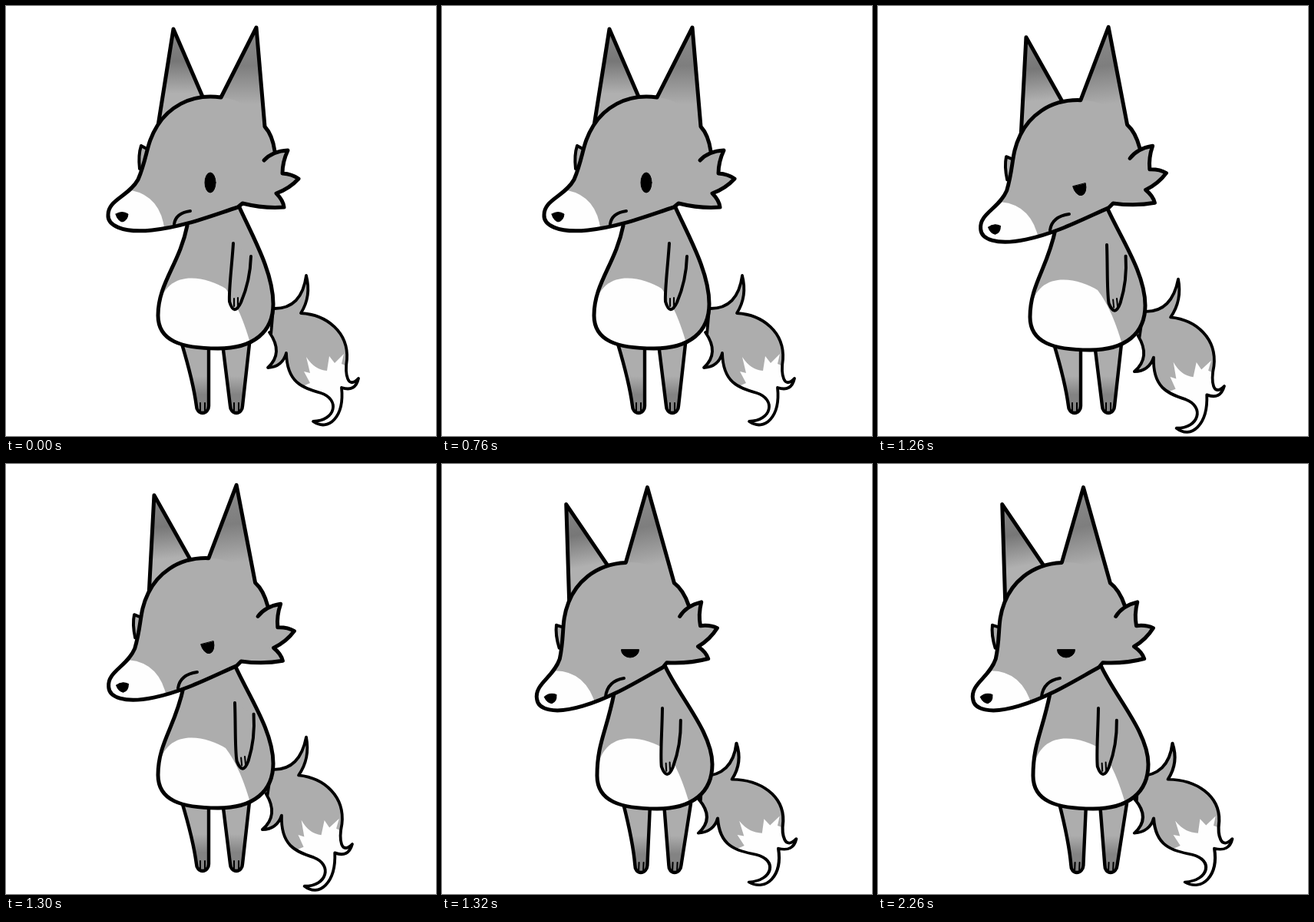
Recreate the animation shown at these times as an HTML page with a canvas. Size 560x560 px, loop 2880 ms.

```html
<!DOCTYPE html>
<html lang="en">
<head>
<meta charset="utf-8">
<title>Drowsy fox</title>
<style>
  html, body { margin: 0; width: 100%; height: 100%; overflow: hidden; background: #fff; }
  canvas { display: block; }
</style>
</head>
<body>
<canvas id="stage" width="560" height="560"></canvas>
<script>
const ctx = document.getElementById('stage').getContext('2d');
const GREY = '#adadad', WHITE = '#fefefe', INK = '#000';
const LOOP = 2880;

function fill(path, color) { ctx.fillStyle = color; ctx.fill(path); }
function line(path, width = 5) { ctx.lineWidth = width; ctx.stroke(path); }
function shape(path, color, width) { fill(path, color); line(path, width); }

function whitePatch(path, inside) {
  ctx.save();
  ctx.clip(inside);
  fill(path, WHITE);
  ctx.restore();
}

function shade(top, bottom, ...colors) {
  const gradient = ctx.createLinearGradient(0, top, 0, bottom);
  colors.forEach((color, i) => gradient.addColorStop(i / (colors.length - 1), color));
  return gradient;
}

function group(matrix, draw) {
  ctx.save();
  ctx.transform(matrix.a, matrix.b, matrix.c, matrix.d, matrix.e, matrix.f);
  draw();
  ctx.restore();
}

const still = new DOMMatrix();
const shift = (x, y) => new DOMMatrix().translate(x, y);

// Shear and stretch around a pivot that itself moves by dx, dy.
function bend(px, py, dx, dy, a, b, c, d) {
  return shift(px + dx, py + dy).multiply(new DOMMatrix([a, b, c, d, 0, 0])).translate(-px, -py);
}

const tail = new Path2D(`M345 428 L348 394 Q385 395 391 351 Q398 378 384 400
  C418 402 446 425 444 460 C441 480 445 500 459 485 Q455 503 437 497
  C441 535 420 555 400 541 C430 540 435 512 410 504 C385 497 366 490 365 452
  Q360 470 341 471 Q362 452 343 425`);
const tailTip = new Path2D(`M380 498 L396 491 388 476 396 478 391 457 Q402 474 418 475
  L421 456 428 465 440 453 437 466 470 480 V555 H390Z`);
const arm = new Path2D('M296 309 C294 340 290 370 291 385 Q297 405 306 386 Q318 358 319 326');
const fingers = new Path2D('M297 381 V391 M302 380 V391');

const skull = `M133 272 C133 252 160 248 172 226 C185 195 182 180 197 156
  C210 135 238 113 280 119 L326 28 337 157 Q347 168 350 189`;
const cheekAndJaw = `Q360 203 360 218 Q373 219 381 225 Q369 238 352 244 Q361 253 362 262
  Q336 264 308 257 L302 262 C265 274 230 288 190 292 C150 296 132 285 133 272`;
const head = new Path2D(`${skull} L367 188 ${cheekAndJaw}`);
const headLine = new Path2D(`${skull} M336 201 Q347 189 367 188 ${cheekAndJaw}`);
const farCheek = new Path2D('M174 212 Q172 194 176 182 L187 188');
const farEar = new Path2D('M198 156 L218 30 256 118');
const nearEar = new Path2D('M280 119 L326 28 337 157 Q315 122 280 119');
const muzzle = new Path2D('M120 242 L163 240 Q203 248 207 296 H120');
const nose = new Path2D('M143 271 Q151 266 159 271 Q158 280 151 281 Q145 279 143 271');

// The neck leans while the round base, placed by its left and bottom edge, stays put.
function drawBody([leftX, leftY, rightX, rightY], x, y) {
  const body = new Path2D();
  body.moveTo(leftX, leftY);
  body.bezierCurveTo(leftX - 10, leftY + 50, x, y - 85, x, y - 43);
  body.bezierCurveTo(x, y - 10, x + 30, y, x + 78, y);
  body.bezierCurveTo(x + 125, y, x + 150, y - 22, x + 150, y - 58);
  body.bezierCurveTo(x + 150, y - 100, rightX + 18, rightY + 40, rightX, rightY);
  const belly = new Path2D();
  belly.moveTo(x, y - 50);
  belly.bezierCurveTo(x + 8, y - 105, x + 60, y - 95, x + 88, y - 78);
  belly.quadraticCurveTo(x + 108, y - 52, x + 122, y);
  belly.lineTo(x, y);
  fill(body, GREY);
  whitePatch(belly, body);
  line(body);
}

function drawLeg(top, foot) {
  const leg = new Path2D();
  leg.moveTo(top, 440);
  leg.quadraticCurveTo(foot - 4, 490, foot, 521);
  leg.ellipse(foot + 8, 521, 8, 9, 0, Math.PI, 0, true);
  leg.lineTo(top + 35, 440);
  shape(leg, shade(482, 506, GREY, '#838383'), 4.4);
  for (const toe of [5, 11]) line(new Path2D(`M${foot + toe} 517 v10`), 2);
}

function drawTail() {
  fill(tail, GREY);
  whitePatch(tailTip, tail);
  line(tail, 3.8);
}

function drawArm() {
  shape(arm, GREY, 4);
  line(fingers, 2);
}

function drawHead() {
  shape(farCheek, GREY, 4);
  shape(farEar, shade(30, 114, '#888', '#777', '#b0b0b0'));
  fill(head, GREY);
  fill(nearEar, shade(28, 128, '#8c8c8c', '#7e7e7e', GREY));
  whitePatch(muzzle, head);
  line(headLine);
  shape(nose, INK, 1);
}

// A sweep of half a turn leaves only the part below the eyelid.
function drawEye(x, y, width, height, tilt, sweep) {
  const eye = new Path2D();
  eye.ellipse(x, y, width, height, tilt, 0, sweep * Math.PI);
  eye.closePath();
  shape(eye, INK, 1);
}

function drawMouth(x, y, w, h) {
  line(new Path2D(`M${x} ${y} q${w * .1} ${-h * .85} ${w} ${-h}`), 4);
}

const poses = [
  {
    until: 1260, head: still, tail: still, arm: still, legs: still,
    neck: [236, 286, 303, 260], base: [198, 446],
    eye: [266, 230, 7, 13, 0, 2], mouth: [219, 284, 21, 17]
  },
  {
    until: 1320, head: shift(-27, 33.6).rotate(-6), legs: still,
    tail: bend(400, 476, -7.5, 7.5, 1, .04, -.06, 1.02),
    arm: shift(298, 311).rotate(-5.7).translate(-296, -309),
    neck: [231, 291, 298, 262], base: [198, 448],
    eye: [262, 233, 8.5, 14, -.25, 1], mouth: [224, 292, 25, 21]
  },
  {
    until: LOOP, head: shift(-58, 64).rotate(-10.8),
    tail: bend(400, 476, -2.5, 6.5, 1.076, -.05, .035, .955),
    arm: shift(287, 318).rotate(-2.9).translate(-296, -309),
    legs: bend(270, 530, 3, 2, 1, 0, -.045, 1),
    neck: [224, 299, 290, 262], base: [202, 449],
    eye: [245, 242, 11.5, 10, 0, 1], mouth: [213, 303, 24, 24]
  }
];

function drawPose(pose) {
  ctx.clearRect(0, 0, 560, 560);
  group(pose.tail, drawTail);
  group(pose.legs, () => {
    drawLeg(229, 248);
    drawLeg(282, 292);
  });
  drawBody(pose.neck, ...pose.base);
  group(pose.arm, drawArm);
  group(pose.head, drawHead);
  drawEye(...pose.eye);
  drawMouth(...pose.mouth);
}

ctx.lineCap = ctx.lineJoin = 'round';
ctx.strokeStyle = INK;
const start = performance.now();

function tick() {
  const time = (performance.now() - start) % LOOP;
  drawPose(poses.find(pose => time < pose.until));
  requestAnimationFrame(tick);
}
tick();
</script>
</body>
</html>
```
